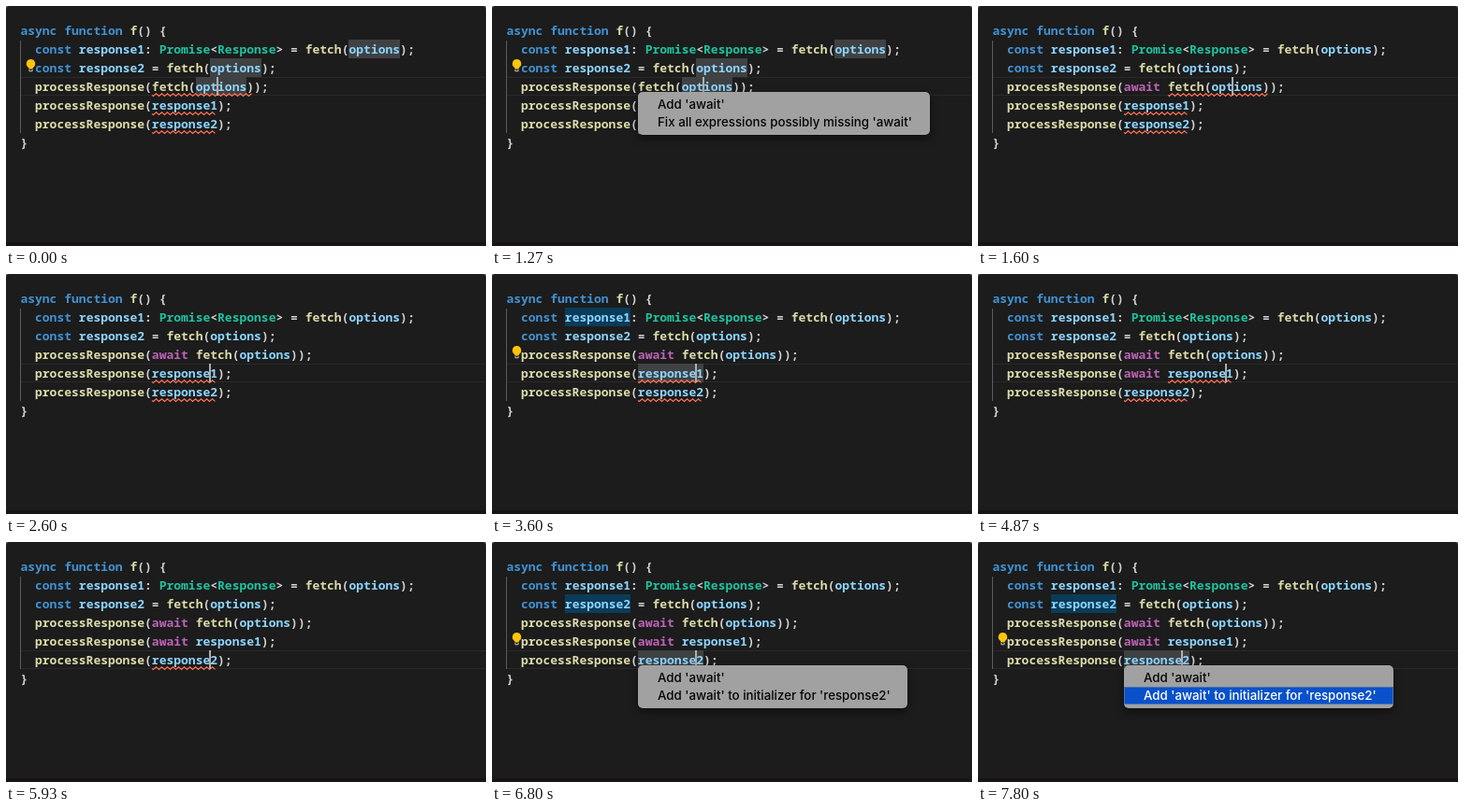
Animation of 513x257 px, one loop 8 s. Source, as an HTML page:

```html
<!DOCTYPE html>
<html lang="en">
<head>
<meta charset="utf-8">
<title>Add await</title>
<style>
html, body { margin: 0; width: 100%; height: 100%; overflow: hidden; background: #6c6c6c; }
#stage { position: absolute; left: 0; top: 0; width: 513px; height: 257px; overflow: hidden; background: #1c1c1c; border-radius: 4px 4px 0 0; }
#stage > * { position: absolute; }
.foot { left: 0; top: 253px; width: 513px; height: 4px; background: #191415; }
.guide { left: 15px; top: 37px; width: 1px; height: 99px; background: #5c5c5c; }
.line { white-space: pre; height: 20px; line-height: 20px; color: #d4d4d4;
  font: 600 13px/20px "Noto Sans Mono", "DejaVu Sans Mono", monospace; font-variant-ligatures: none; }
.key { color: #4192d3; }
.flow { color: #bd63b6; }
.type { color: #1ec3a0; }
.call { color: #dcdcaa; }
.name { color: #8cd5ff; }
.row { left: 16px; width: 497px; height: 18px; border: solid #292929; border-width: 1px 0; }
.word { height: 20px; background: #404142; }
.word.write { background: #0a3c5a; }
.caret { width: 2px; height: 20px; background: #aeafad; }
svg { overflow: visible; }
.menu { height: 38px; padding: 4px 0; background: #a1a1a1; border-radius: 5px;
  box-shadow: 0 4px 10px rgba(0,0,0,.45), 0 0 1px rgba(0,0,0,.6);
  font: 500 13.3px/19px Inter, "Liberation Sans", sans-serif; color: #050505; }
.item { position: relative; height: 19px; padding-left: 21px; white-space: pre; }
.lit { position: absolute; inset: 0; padding-left: 21px; background: #0951ca; color: #fff;
  box-shadow: inset 0 0 0 1px #4a73b8; }
</style>
</head>
<body>
<div id="stage"></div>
<script>
const LOOP = 8000, CH = 7.8, X0 = 15.4;
const stage = document.getElementById('stage');
const colX = c => X0 + c * CH;
const rowY = r => 16 + 20 * r;

function add(cls, style = {}, html = '', parent = stage) {
  const el = document.createElement('div');
  el.className = cls;
  for (const k in style) el.style[k] = typeof style[k] === 'number' ? style[k] + 'px' : style[k];
  el.innerHTML = html;
  parent.append(el);
  return el;
}

// steps: [time, value] pairs, each value held until the next
function hold(el, prop, steps) {
  const frames = steps.map(([t, v]) => ({ offset: t / LOOP, [prop]: v, easing: 'step-end' }));
  frames.push({ offset: 1, [prop]: steps[steps.length - 1][1] });
  el.animate(frames, { duration: LOOP, iterations: Infinity });
}

// spans: [from, to] pairs in which the element is seen
function show(el, ...spans) {
  const steps = spans[0][0] > 0 ? [[0, 'hidden']] : [];
  for (const [a, b] of spans) {
    steps.push([a, 'visible']);
    if (b < LOOP) steps.push([b, 'hidden']);
  }
  hold(el, 'visibility', steps);
}

function paint(code) {
  return code.replace(/\w+|[<>]/g, (w, i) => {
    if (w === '<') return '&lt;';
    if (w === '>') return '&gt;';
    const cls = /^(async|function|const)$/.test(w) ? 'key'
      : w === 'await' ? 'flow'
      : /^(Promise|Response)$/.test(w) ? 'type'
      : code[i + w.length] === '(' ? 'call' : 'name';
    return `<span class="${cls}">${w}</span>`;
  });
}

const row = r => add('row', { top: rowY(r) });
const line = (r, code) => add('line', { left: X0, top: rowY(r) }, paint(code));
const word = (r, c, n, cls = '') => add('word ' + cls, { left: colX(c), top: rowY(r), width: n * CH });
const caret = (r, c) => add('caret', { left: colX(c) - 1.4, top: rowY(r) });

function squiggle(r, c, n) {
  const w = n * CH;
  let d = 'M0 2';
  for (let x = 1.5, up = 0; x < w; x += 3, up ^= 1) d += `L${x} ${up ? 0.4 : 3}`;
  return add('', { left: colX(c), top: rowY(r) + 17 },
    `<svg width="${w}" height="4" style="display:block"><path d="${d}" transform="translate(0 .4)" fill="none" stroke="#ff6f52" stroke-width="1.2"/></svg>`);
}

function bulb(r) {
  return add('', { left: 20, top: rowY(r) }, `<svg width="13" height="20" style="display:block">
    <path d="M6.5 1a4.7 4.7 0 0 0-2.9 8.4q.9.8.9 2.1h4q0-1.3.9-2.1A4.7 4.7 0 0 0 6.5 1z" fill="#ffc40a"/>
    <path d="M4.9 12v1.8h3.2V12" fill="none" stroke="#c9c9c9"/></svg>`);
}

// lit: for each item, the spans in which it is selected
function menu(top, width, items, lit, fade) {
  const el = add('menu', { left: 156, top, width });
  items.forEach((text, i) => {
    const item = add('item', {}, text, el);
    if (lit[i]) show(add('lit', {}, text, item), ...lit[i]);
  });
  hold(el, 'opacity', fade);
}

const EDIT1 = 1530, CLICK1 = 2600, EDIT2 = 4870, CLICK2 = 5800;

add('foot');
show(row(3), [0, CLICK1]);
show(row(4), [CLICK1, CLICK2]);
show(row(5), [CLICK2, LOOP]);

for (const [r, c] of [[1, 45], [2, 26], [3, 24]]) show(word(r, c, 7), [0, EDIT1]);
show(word(1, 8, 9, 'write'), [2870, EDIT2]);
show(word(4, 18, 9), [2870, EDIT2]);
show(word(2, 8, 9, 'write'), [6070, LOOP]);
show(word(5, 18, 9), [6070, LOOP]);
add('guide');

line(0, 'async function f() {');
line(1, '  const response1: Promise<Response> = fetch(options);');
line(2, '  const response2 = fetch(options);');
show(line(3, '  processResponse(fetch(options));'), [0, EDIT1]);
show(line(3, '  processResponse(await fetch(options));'), [EDIT1, LOOP]);
show(line(4, '  processResponse(response1);'), [0, EDIT2]);
show(line(4, '  processResponse(await response1);'), [EDIT2, LOOP]);
line(5, '  processResponse(response2);');
line(6, '}');

show(squiggle(3, 18, 14), [0, EDIT1]);
show(squiggle(3, 24, 14), [EDIT1, 1930]);
show(squiggle(4, 18, 9), [0, EDIT2]);
show(squiggle(4, 24, 9), [EDIT2, 5270]);
squiggle(5, 18, 9);

show(bulb(2), [0, EDIT1]);
show(bulb(3), [2930, EDIT2]);
show(bulb(4), [6130, LOOP]);

show(caret(3, 27), [0, 330], [800, 1330]);
show(caret(3, 33), [EDIT1, 2070]);
show(caret(4, 26), [CLICK1, 3130], [3600, 4130]);
show(caret(4, 32), [EDIT2, 5400]);
show(caret(5, 26), [CLICK2, 6330], [6800, 7330], [7800, LOOP]);

const addAwait = "Add 'await'", fixAll = "Fix all expressions possibly missing 'await'";
menu(92, 312, [addAwait, fixAll], [[[330, 1270], [1330, EDIT1]]],
  [[0, 0], [70, 1], [1400, .7], [1470, .35], [EDIT1, 0]]);
menu(112, 312, [addAwait, fixAll], [[[4330, 4600], [4670, EDIT2]]],
  [[0, 0], [3800, 1], [4730, .7], [4800, .35], [EDIT2, 0]]);
menu(132, 288, [addAwait, "Add 'await' to initializer for 'response2'"], [[[7200, 7330]], [[7330, LOOP]]],
  [[0, 0], [6530, 1]]);
</script>
</body>
</html>
```
